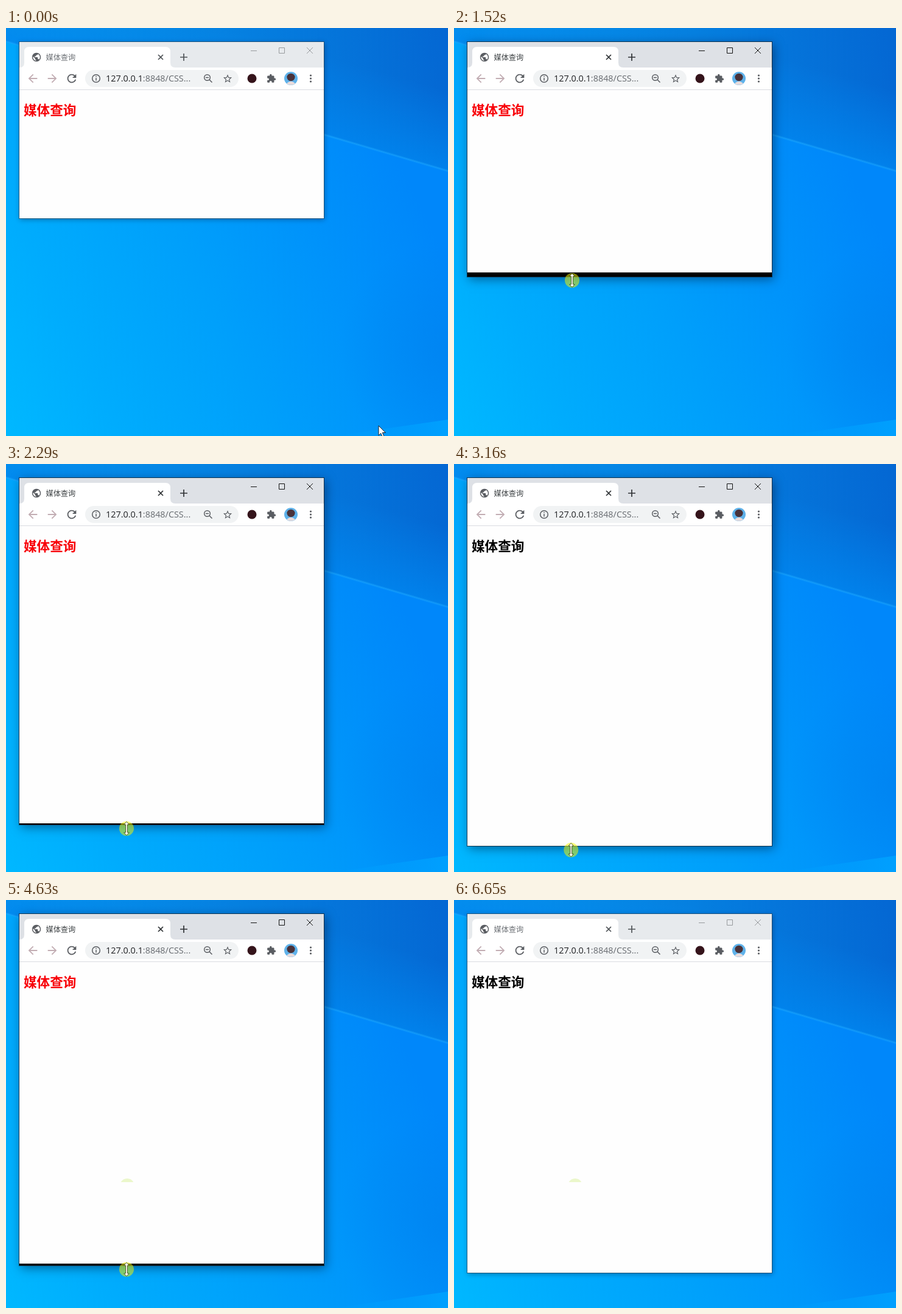
Animation, 726 px wide and 671 px high, one loop 6800 ms. Source, as an HTML page:

```html
<!DOCTYPE html>
<html lang="zh">
<head>
<meta charset="utf-8">
<title>媒体查询</title>
<style>
html, body { margin: 0; width: 100%; height: 100%; overflow: hidden; background: #00a0fb; }
body { position: relative; }
svg { display: block; }
.layer { position: absolute; left: 0; top: 0; }
#win {
  position: absolute; left: 22px; top: 23px; width: 500px; height: 290px; background: #000;
  box-shadow: 0 0 0 1px rgba(40, 62, 78, .62), 1px 2px 8px rgba(0, 15, 40, .4);
  --bar: #e7eaed; --title: #6b6f74; --ctl: #979a9d; --tool: #505458;
}
#win.on {
  box-shadow: 0 0 0 1px rgba(14, 34, 48, .78), 3px 4px 16px rgba(0, 15, 40, .5);
  --bar: #dee1e6; --title: #3c4043; --ctl: #111; --tool: #303336;
}
#page { width: 500px; background: #fefefe; overflow: hidden; }
.cjk { font-family: "Noto Sans CJK SC", "Noto Sans CJK", sans-serif; }
.url { font: 14.4px "Open Sans", "Noto Sans", sans-serif; }
.strip { fill: var(--bar); }
.ctl { stroke: var(--ctl); fill: none; }
.tool { stroke: var(--tool); stroke-width: 1.7; fill: none; }
.icon { fill: #5a5d62; }
.line { stroke: #5a5d62; stroke-width: 1.5; fill: none; }
</style>
</head>
<body>
<svg class="layer" width="726" height="671" viewBox="0 0 726 671">
  <defs>
    <linearGradient id="base" gradientUnits="userSpaceOnUse" x1="0" y1="671" x2="700" y2="330">
      <stop offset="0" stop-color="#00b8ff"/>
      <stop offset=".22" stop-color="#00acfd"/>
      <stop offset=".5" stop-color="#00a0fb"/>
      <stop offset="1" stop-color="#0087fa"/>
    </linearGradient>
    <linearGradient id="sky" gradientUnits="userSpaceOnUse" x1="0" y1="90" x2="726" y2="0">
      <stop offset="0" stop-color="#0898ea"/>
      <stop offset=".55" stop-color="#057fe0"/>
      <stop offset="1" stop-color="#0467d3"/>
    </linearGradient>
    <linearGradient id="glow" gradientUnits="userSpaceOnUse" x1="610" y1="70" x2="576" y2="190">
      <stop offset="0" stop-color="#0086f0" stop-opacity="0"/>
      <stop offset="1" stop-color="#0086f0" stop-opacity=".8"/>
    </linearGradient>
    <radialGradient id="dim" gradientUnits="userSpaceOnUse" cx="726" cy="530" r="180">
      <stop offset="0" stop-color="#007fea" stop-opacity=".5"/>
      <stop offset="1" stop-color="#007fea" stop-opacity="0"/>
    </radialGradient>
    <linearGradient id="floor" gradientUnits="userSpaceOnUse" x1="520" y1="0" x2="726" y2="0">
      <stop offset="0" stop-color="#00a2ff" stop-opacity="0"/>
      <stop offset="1" stop-color="#00a2ff" stop-opacity=".9"/>
    </linearGradient>
  </defs>
  <rect width="726" height="671" fill="url(#base)"/>
  <rect x="546" y="350" width="180" height="321" fill="url(#dim)"/>
  <path d="M540 671 726 644V671Z" fill="url(#floor)"/>
  <path d="M0 0H726V235L0 22Z" fill="url(#sky)"/>
  <path d="M0 0H726V235L0 22Z" fill="url(#glow)"/>
  <path d="M0 22 726 235" stroke="#18a4ff" stroke-width="4" opacity=".3"/>
  <path d="M0 22 726 235" stroke="#22acff" stroke-width="1.6" opacity=".4"/>
</svg>

<div id="win"><div id="page">
  <svg width="500" height="640" viewBox="22 23 500 640">
    <rect class="strip" x="22" y="23" width="500" height="42"/>
    <path d="M22 65Q30 65 30 57V39Q30 31 38 31H262Q270 31 270 39V57Q270 65 278 65Z" fill="#fff"/>
    <rect x="22" y="65" width="500" height="36" fill="#fff"/>
    <path d="M22 101.5H522" stroke="#dadce0"/>
    <path class="icon" transform="translate(41.4 39.4) scale(.72)" d="M12 2C6.48 2 2 6.48 2 12s4.48 10 10 10 10-4.48 10-10S17.52 2 12 2zm-1 17.93c-3.95-.49-7-3.85-7-7.93 0-.62.08-1.21.21-1.79L9 15v1c0 1.1.9 2 2 2v1.93zm6.9-2.54c-.26-.81-1-1.39-1.9-1.39h-1v-3c0-.55-.45-1-1-1H8v-2h2c.55 0 1-.45 1-1V7h2c1.1 0 2-.9 2-2v-.41c2.93 1.19 5 4.06 5 7.41 0 2.08-.8 3.97-2.1 5.39z"/>
    <text class="cjk" x="65.5" y="52.8" font-size="12.2" style="fill:var(--title)">媒体查询</text>
    <path class="tool" d="M250 44l8 8m0-8l-8 8M286 48h12M292 42v12"/>
    <path class="ctl" d="M402 37.5h10M448.5 32.5h9v9h-9zM494 32l10 10m0-10l-10 10"/>

    <g fill="#c2adb3">
      <path id="back" transform="translate(33 72) scale(.917)" d="M20 11H7.83l5.59-5.59L12 4l-8 8 8 8 1.41-1.41L7.83 13H20v-2z"/>
      <use href="#back" transform="translate(120 0) scale(-1 1)"/>
    </g>
    <path class="icon" transform="translate(97 72) scale(.917)" d="M17.65 6.35C16.2 4.9 14.21 4 12 4c-4.42 0-7.99 3.58-7.99 8s3.57 8 7.99 8c3.73 0 6.84-2.55 7.73-6h-2.08c-.82 2.33-3.04 4-5.65 4-3.31 0-6-2.69-6-6s2.69-6 6-6c1.66 0 3.14.69 4.22 1.78L13 11h7V4l-2.35 2.35z"/>
    <rect x="130" y="69" width="252" height="28" rx="14" fill="#f1f3f4"/>
    <circle class="line" cx="148" cy="83" r="6.3"/>
    <path class="line" d="M148 82v4.5M148 79v1.6"/>
    <text class="url" x="164" y="88" fill="#202124">127.0.0.1<tspan fill="#666a6f">:8848/CSS...</tspan></text>
    <circle class="line" cx="330.5" cy="81.5" r="4.8"/>
    <path class="line" d="M334 85l4.5 4.5M328 81.5h5"/>
    <path class="icon" transform="translate(355.5 74.8) scale(.71)" d="M22 9.24l-7.19-.62L12 2 9.19 8.63 2 9.24l5.46 4.73L5.82 21 12 17.27 18.18 21l-1.63-7.03L22 9.24zM12 15.4l-3.76 2.27 1-4.28-3.32-2.88 4.38-.38L12 6.1l1.71 4.04 4.38.38-3.32 2.88 1 4.28L12 15.4z"/>
    <circle cx="404" cy="83" r="7.5" fill="#35141b"/>
    <path class="icon" transform="translate(427.8 75.2) scale(.667)" d="M20.5 11H19V7c0-1.1-.9-2-2-2h-4V3.5C13 2.12 11.88 1 10.5 1S8 2.12 8 3.5V5H4c-1.1 0-1.99.9-1.99 2v3.8H3.5c1.49 0 2.7 1.21 2.7 2.7s-1.21 2.7-2.7 2.7H2V20c0 1.1.9 2 2 2h3.8v-1.5c0-1.49 1.21-2.7 2.7-2.7 1.49 0 2.7 1.21 2.7 2.7V22H17c1.1 0 2-.9 2-2v-4h1.5c1.38 0 2.5-1.12 2.5-2.5S21.88 11 20.5 11z"/>
    <circle cx="468" cy="83" r="11" fill="#5fb2ea"/>
    <path d="M461 91.5Q468 84 475 91.5Q468 96 461 91.5Z" fill="#e9dcdc"/>
    <ellipse cx="468" cy="81" rx="6.6" ry="6.2" fill="#4a323a"/>
    <g class="icon"><circle cx="500.5" cy="78" r="1.6"/><circle cx="500.5" cy="83" r="1.6"/><circle cx="500.5" cy="88" r="1.6"/></g>

    <text id="head" class="cjk" x="29" y="143" font-size="21.6" font-weight="700">媒体查询</text>
    <path id="trace" d="M188.6 464A12 12 0 0 1 209.4 464Z" fill="#ebf7cb"/>
  </svg>
</div></div>

<svg class="layer" width="726" height="671" viewBox="0 0 726 671">
  <g id="pointer">
    <circle id="press" r="12" fill="#f5f500" opacity=".52"/>
    <path id="sizer" d="M0-11.3 4.3-6.5H1.4V6.5H4.3L0 11.3-4.3 6.5H-1.4V-6.5H-4.3Z" fill="#fffff0" stroke="#3d4a20" stroke-width=".9"/>
    <path id="arrow" d="M.5.5V16.5L4.2 13 6.7 18.6 9.2 17.5 6.8 12H11.8Z" fill="#fff" stroke="#111" stroke-width=".9"/>
  </g>
</svg>

<script>
const LOOP = 6800, STEP = 78;
const GRAB = 1190, RELEASE = 5400, LEAVE = 5950, BLUR = 6650;
const TOP = 23, GRIP = 6.5, BREAK = 602;
const $ = id => document.getElementById(id);

// Turning points of the pointer: time, x, y
const path = [
  [60, 611.5, 653.5], [340, 152, 278], [480, 184, 306], [640, 189, 319.5], [GRAB, 189, 319.5],
  [1502, 194, 415], [1892, 196, 536], [2282, 198, 599.5], [2828, 193, 634], [3250, 192, 635],
  [3920, 199, 468], [4622, 198, 607.5], [4940, 197, 619.5], [5900, 198, 619.5],
  [LEAVE, 200, 606], [6262, 645, 660], [6340, 760, 674]
];

function pointer(t) {
  const i = path.findIndex(p => p[0] > t);
  if (i < 1) return path.at(i).slice(1);
  const [t0, x0, y0] = path[i - 1], [t1, x1, y1] = path[i], u = (t - t0) / (t1 - t0);
  return [x0 + (x1 - x0) * u, y0 + (y1 - y0) * u];
}

// The edge trails a change of speed; fast growth leaves a strip unpainted
function edge(time) {
  const t = Math.min(Math.max(time, GRAB), RELEASE);
  const [y, y1, y2] = [0, 1, 2].map(n => pointer(t - n * STEP * (t > GRAB))[1]);
  const speed = y - y1, change = speed - (y1 - y2);
  const bottom = Math.round(y - GRIP - change * .24);
  return [bottom, bottom - Math.round(Math.max(0, speed) ** 2 / 80)];
}

const show = (id, on) => $(id).setAttribute("visibility", on ? "visible" : "hidden");

function draw(time) {
  const t = GRAB + Math.floor((time - GRAB) / STEP) * STEP;
  const [x, y] = pointer(t), [bottom, painted] = edge(t);
  const sizing = t >= 600 && t < LEAVE;

  $("win").className = t >= GRAB && t < BLUR ? "on" : "";
  $("win").style.height = bottom - TOP + "px";
  $("page").style.height = painted - TOP + "px";
  $("head").setAttribute("fill", painted >= BREAK ? "#000" : "#f80008");
  $("pointer").setAttribute("transform", `translate(${x} ${y})`);
  show("trace", t > 3920);
  show("press", t >= GRAB && t < RELEASE);
  show("sizer", sizing);
  show("arrow", !sizing);
}

let start;
function tick(now) {
  start ??= now;
  draw((now - start) % LOOP);
  requestAnimationFrame(tick);
}
draw(0);
requestAnimationFrame(tick);
</script>
</body>
</html>
```
